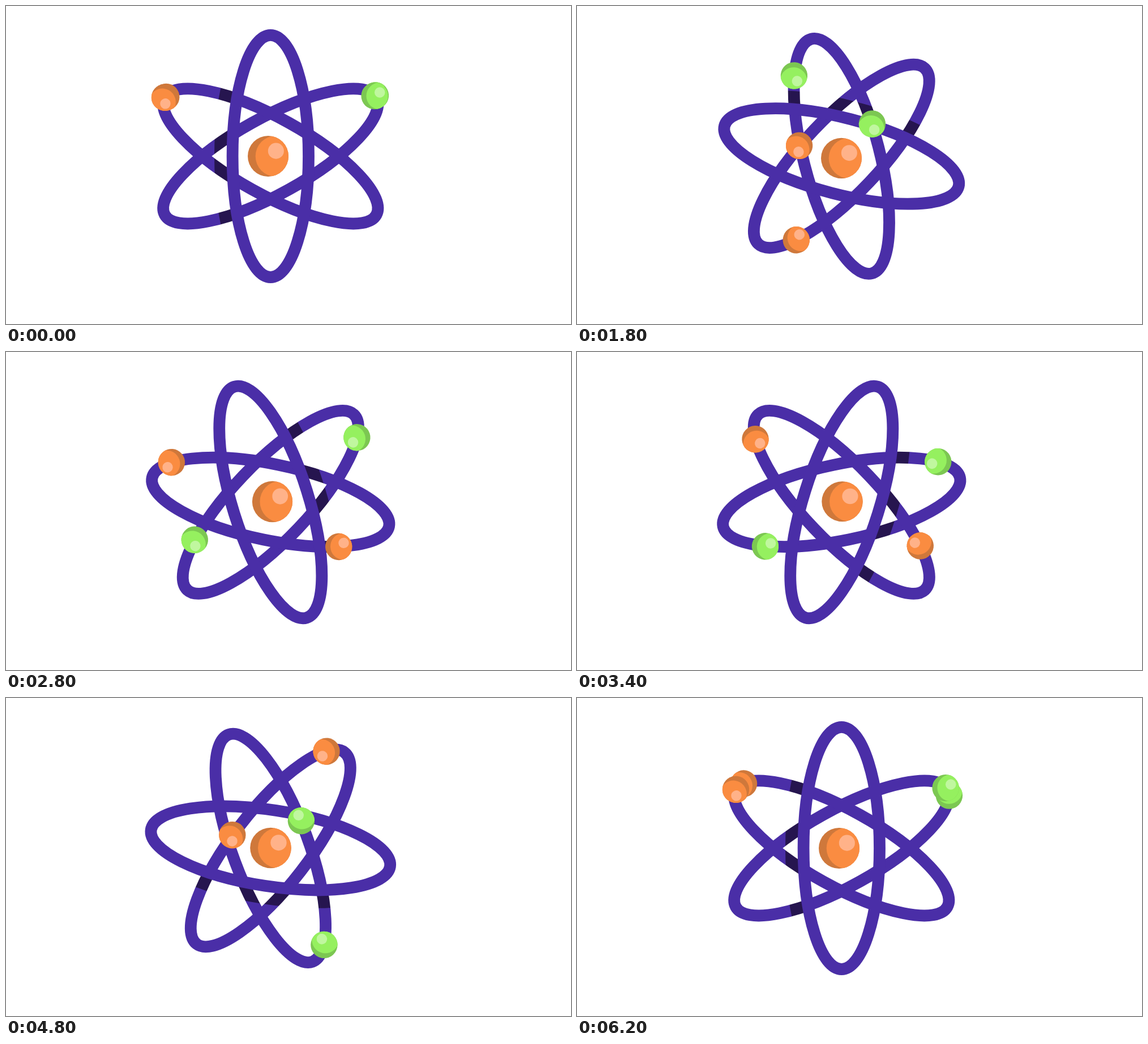
These frames come from a looping animation (998x561 px, 6.23 s). An HTML page with a canvas:

```html
<!DOCTYPE html>
<html lang="en">
<head>
<meta charset="utf-8">
<title>Atom</title>
<style>
  html, body { margin: 0; width: 100%; height: 100%; overflow: hidden; background: #fff; }
  canvas { display: block; }
</style>
</head>
<body>
<canvas id="stage" width="998" height="561"></canvas>
<script>
const ctx = document.getElementById('stage').getContext('2d');
const LOOP = 6230, STEPS = 155, TAU = Math.PI * 2;
const CX = 467.3, CY = 264.9, RX = 67.2, RY = 213.6, BAND = 20.8, TILT = 61;
const RING = '#4a2ea7', SHADE = '#26154f';
const ORANGE = { body: '#fa8c41', dark: '#cf783b', shine: '#ffb289' };
const GREEN = { body: '#95f05f', dark: '#7cc752', shine: '#c0f79f' };

// Electrons: ring tilt, laps per step, first lap position, offset along the ring's axis
const FAST = 0.0128, SLOW = 1 / STEPS;
const electrons = [
  { skin: ORANGE, tilt: -TILT, speed: FAST, start: -0.002, long: -1.5, follow: true },
  { skin: GREEN, tilt: TILT, speed: FAST, start: 0.004, long: 0.5, follow: true },
  { skin: ORANGE, tilt: -TILT, speed: SLOW, start: 0, long: 0, follow: true },
  { skin: GREEN, tilt: TILT, speed: SLOW, start: 0.004, long: -1, follow: false }
];

// Nucleus wobble: step, x, y, rx, ry
const wobble = [
  [0, 463, 265, 36, 36],
  [20, 465.5, 262.7, 34.8, 36.5],
  [45, 467, 268.5, 36, 35.7],
  [70, 470.5, 264, 35.6, 36.2],
  [100, 466.5, 263.5, 36.8, 34.8],
  [120, 467.5, 264.5, 36.3, 35.7],
  [155, 463, 265, 36, 36]
];

const rad = deg => deg * Math.PI / 180;

// Arc length table, so electrons travel at constant speed
const PARTS = 1440;
const arc = [0];
for (let i = 0; i < PARTS; i++) {
  const a = (i + 0.5) / PARTS * TAU;
  arc.push(arc[i] + Math.hypot(RX * Math.cos(a), RY * Math.sin(a)));
}

function angleAt(lap) {
  const want = (lap - Math.floor(lap)) * arc[PARTS];
  let lo = 0, hi = PARTS;
  while (hi - lo > 1) {
    const mid = (lo + hi) >> 1;
    if (arc[mid] <= want) lo = mid; else hi = mid;
  }
  return (lo + (want - arc[lo]) / (arc[hi] - arc[lo])) / PARTS * TAU;
}

// 25 pictures per second shown on a 30 per second clock
function stepAt(ms) {
  const rest = ms % 100;
  const tick = Math.floor(ms / 100) * 3 + (rest >= 30) + (rest >= 70);
  return Math.min(STEPS, Math.floor(tick * 5 / 6));
}

function disc(x, y, r, color) {
  ctx.fillStyle = color;
  ctx.beginPath();
  ctx.arc(x, y, r, 0, TAU);
  ctx.fill();
}

function ball(x, y, rx, ry, turn, skin) {
  ctx.save();
  ctx.translate(x, y);
  ctx.rotate(turn);
  ctx.scale(rx, ry);
  disc(0, 0, 1, skin.dark);
  ctx.clip();
  disc(0.38, 0, 1, skin.body);
  disc(0.385, -0.26, 0.39, skin.shine);
  ctx.restore();
}

function inRing(deg, paint) {
  ctx.save();
  ctx.translate(CX, CY);
  ctx.rotate(rad(deg));
  paint();
  ctx.restore();
}

function ring() {
  ctx.strokeStyle = RING;
  ctx.lineWidth = BAND;
  ctx.beginPath();
  ctx.ellipse(0, 0, RX, RY, 0, 0, TAU);
  ctx.stroke();
}

function shadow() {
  ctx.globalCompositeOperation = 'source-atop';
  ctx.strokeStyle = SHADE;
  ctx.lineWidth = 25;
  ctx.beginPath();
  ctx.ellipse(-19.6, 0, RX, RY, 0, TAU / 4, TAU * 3 / 4);
  ctx.stroke();
}

function electron(e, step, spin) {
  const a = angleAt(e.start + e.speed * step);
  inRing(spin + e.tilt, () => {
    const x = -(RX + 0.8) * Math.sin(a);
    const y = -(RY + e.long) * Math.cos(a);
    const turn = e.follow
      ? Math.atan2(RY * Math.sin(a), -RX * Math.cos(a))
      : -rad(e.tilt);
    ball(x, y, 23.7, 23.7, turn, e.skin);
  });
}

function nucleus(step) {
  let i = 0;
  while (i < wobble.length - 2 && step >= wobble[i + 1][0]) i++;
  const from = wobble[i], to = wobble[i + 1];
  const k = (step - from[0]) / (to[0] - from[0]);
  const ease = (1 - Math.cos(Math.PI * k)) / 2;
  const [, x, y, rx, ry] = from.map((v, j) => v + (to[j] - v) * ease);
  ball(x, y, rx, ry, 0, ORANGE);
}

function draw(ms) {
  const step = stepAt(ms);
  const spin = 360 * step / STEPS;
  ctx.clearRect(0, 0, 998, 561);
  inRing(spin + TILT, ring);
  inRing(spin - TILT, ring);
  inRing(spin, shadow);
  inRing(spin, ring);
  nucleus(step);
  electrons.forEach(e => electron(e, step, spin));
}

const begin = performance.now();
function frame() {
  draw((performance.now() - begin) % LOOP);
  requestAnimationFrame(frame);
}
frame();
</script>
</body>
</html>
```
